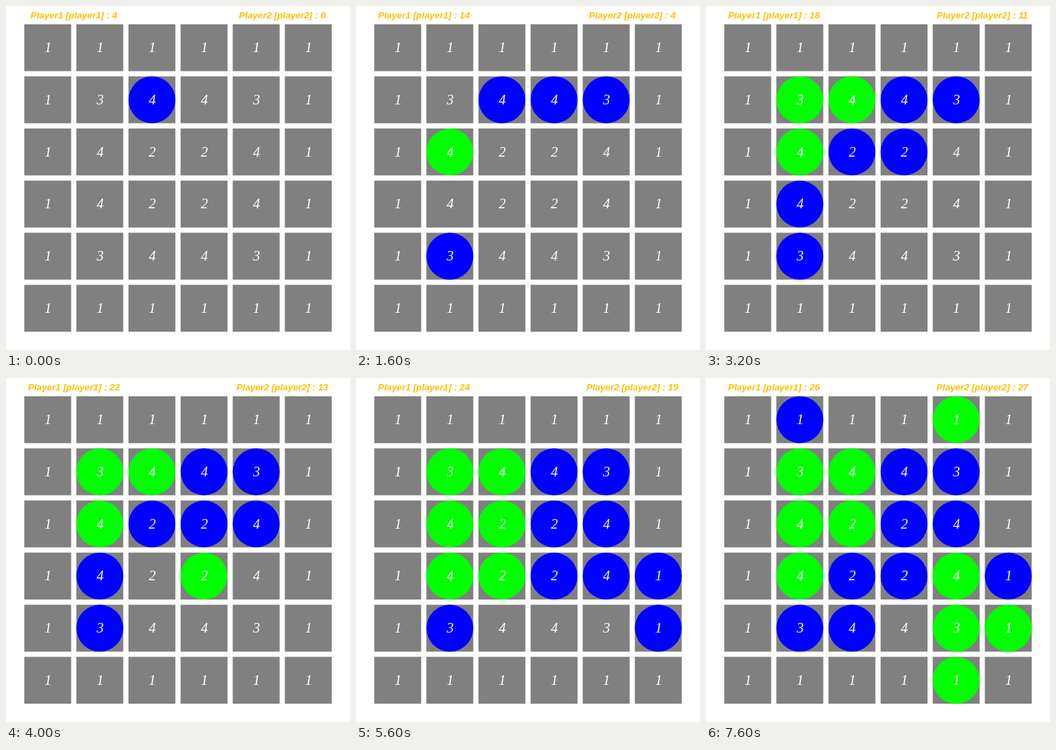
An HTML page that plays this animation: 500 by 500 pixels, repeating every 8000 ms.

```html
<!DOCTYPE html>
<html lang="en">
<head>
<meta charset="utf-8">
<title>Board game</title>
<style>
  html, body { margin: 0; width: 100%; height: 100%; overflow: hidden; background: #fff; }
  svg { display: block; width: 100%; height: 100%; }
  text { text-anchor: middle; }
  .score { font: italic bold 13.33px "Liberation Sans", Arial, sans-serif; fill: #ffc000; }
  .value { font: italic 20.5px "Liberation Serif", "Times New Roman", serif; fill: #fff; }
</style>
</head>
<body>
<svg id="stage" viewBox="0 0 500 500"></svg>
<script>
const STEP = 400;
const PITCH = 500 / 6.6;
const CELL = PITCH * 0.9;
const START = (500 - 5 * PITCH - CELL) / 2;
const COLORS = ['#0000ff', '#00ff00'];
const VALUES = ['111111', '134431', '142241', '142241', '134431', '111111'];
// Row and column of each move; the players take turns.
const MOVES = '12 14 13 21 41 11 31 22 23 33 24 32 34 45 35 54 42 44 01 04'.split(' ');

const stage = document.getElementById('stage');

function add(tag, attrs, content = '') {
  const el = document.createElementNS('http://www.w3.org/2000/svg', tag);
  for (const key in attrs) el.setAttribute(key, attrs[key]);
  el.textContent = content;
  stage.append(el);
  return el;
}

const scores = [98.7, 401.6].map(x => add('text', { class: 'score', x, y: 18 }));

const discs = VALUES.map((row, r) => [...row].map((value, c) => {
  const x = START + c * PITCH, y = START + r * PITCH;
  const cx = x + CELL / 2, cy = y + CELL / 2;
  add('rect', { x, y, width: CELL, height: CELL, fill: '#808080' });
  const disc = add('circle', { cx, cy, r: CELL / 2 });
  add('text', { class: 'value', x: cx + 0.5, y: cy + 6.5 }, value);
  return disc;
}));

// A piece beside a friend captures every enemy next to it.
function play(board, [row, col], player) {
  const r = +row, c = +col;
  const near = [[r - 1, c], [r + 1, c], [r, c - 1], [r, c + 1]]
    .filter(([y, x]) => y >= 0 && y < 6 && x >= 0 && x < 6);
  board[r][c] = player;
  if (near.some(([y, x]) => board[y][x] === player)) {
    for (const [y, x] of near) {
      if (board[y][x] !== null) board[y][x] = player;
    }
  }
}

function boardAfter(count) {
  const board = VALUES.map(() => Array(6).fill(null));
  MOVES.slice(0, count).forEach((move, i) => play(board, move, i % 2));
  return board;
}

let shown = -1;

function draw(time) {
  const turn = Math.floor(time / STEP) % MOVES.length;
  if (turn === shown) return;
  shown = turn;
  const totals = [0, 0];
  boardAfter(turn + 1).forEach((row, r) => row.forEach((owner, c) => {
    discs[r][c].setAttribute('fill', owner === null ? 'none' : COLORS[owner]);
    if (owner !== null) totals[owner] += +VALUES[r][c];
  }));
  scores.forEach((label, i) => {
    label.textContent = `Player${i + 1} [player${i + 1}] : ${totals[i]}`;
  });
}

const begin = performance.now();
function tick() {
  draw(performance.now() - begin);
  requestAnimationFrame(tick);
}
tick();
</script>
</body>
</html>
```
